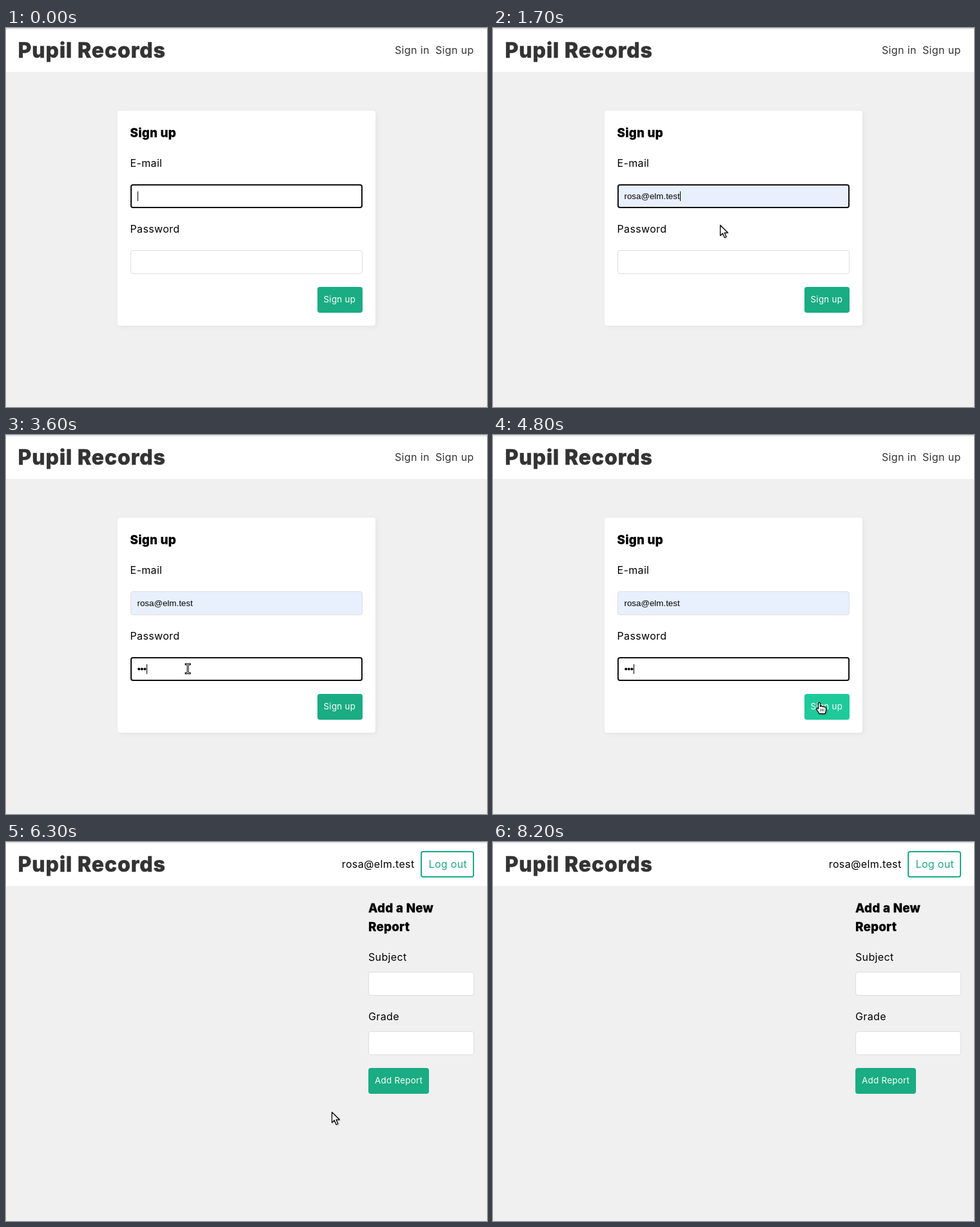
Write an HTML page that moves like this. It is 746 px wide and 587 px high and loops after 8600 ms.

```html
<!DOCTYPE html>
<html lang="en">
<head>
<meta charset="utf-8">
<title>Sign up demo</title>
<style>
  html, body { margin: 0; width: 100%; height: 100%; overflow: hidden; background: #f0f0f0; }
  svg { display: block; width: 746px; height: 587px; }
  text { font: 16px Inter, sans-serif; letter-spacing: .35px; }
  .title { font-size: 32px; font-weight: 800; fill: #333; stroke: #333; stroke-width: .6; letter-spacing: .95px; }
  .heading { font-size: 18.72px; font-weight: 800; stroke: #000; stroke-width: .3; letter-spacing: .3px; }
  .nav { fill: #333; }
  .label { font-size: 13.33px; fill: #fff; letter-spacing: .3px; }
  .typed { font: 13.33px "Liberation Sans", Arial, sans-serif; letter-spacing: 0; }
  .hint { font: 13.6px "Noto Sans", sans-serif; letter-spacing: 0; fill: #222; }
  .button { fill: #1aac83; }
  .field { fill: #fff; stroke: #ddd; }
  .ring { fill: none; stroke: #101010; stroke-width: 2; }
  .card { fill: #fff; filter: drop-shadow(2px 2px 3px rgba(0, 0, 0, .05)); }
  .popup { fill: #fff; filter: drop-shadow(0 1px 1.5px rgba(0, 0, 0, .3)); }
  .outlined { fill: #fff; stroke: #000; stroke-width: 1.25; stroke-linejoin: round; filter: drop-shadow(1px 1px 1px rgba(0, 0, 0, .25)); }
</style>
</head>
<body>
<svg viewBox="0 0 746 587">
  <defs>
    <linearGradient id="edge" x2="0" y2="1">
      <stop stop-color="#d8d8d8"/><stop offset="1" stop-color="#fff"/>
    </linearGradient>
    <path id="beamShape" d="M-3 -7H-1.5L0 -6L1.5 -7H3M0 -6V6M-3 7H-1.5L0 6L1.5 7H3"/>
  </defs>
  <rect width="746" height="587" fill="#f0f0f0"/>
  <rect width="746" height="68" fill="#fff"/>
  <rect width="746" height="3" fill="url(#edge)"/>
  <text class="title" x="18.5" y="45.5">Pupil Records</text>

  <g id="signup">
    <text class="nav" x="603" y="40">Sign in</text>
    <text class="nav" x="666" y="40">Sign up</text>
    <rect class="card" x="173" y="128" width="400" height="333" rx="4"/>
    <text class="heading" x="192.5" y="169">Sign up</text>
    <text x="192.5" y="215">E-mail</text>
    <rect class="field" id="emailField" x="193.5" y="242.5" width="359" height="36" rx="3.5"/>
    <text class="typed" id="email" x="203.5" y="265"></text>
    <text x="192.5" y="317">Password</text>
    <rect class="field" x="193.5" y="344.5" width="359" height="36" rx="3.5"/>
    <g id="dots">
      <circle cx="206.2" cy="362.5" r="2"/>
      <circle cx="210.8" cy="362.5" r="2"/>
      <circle cx="215.4" cy="362.5" r="2"/>
    </g>
    <rect class="ring" id="ring" x="194" width="358" height="35" rx="3"/>
    <rect id="caret" width="1" height="15"/>
    <rect class="button" id="submit" x="483" y="401" width="70" height="40" rx="4"/>
    <text class="label" x="492.5" y="425">Sign up</text>
    <g id="popup">
      <path class="popup" d="M294 288H304L313 279.5L322 288H420Q423 288 423 291V329Q423 332 420 332H294Q291 332 291 329V291Q291 288 294 288Z"/>
      <text class="hint" x="303.5" y="315">rosa@elm.test</text>
    </g>
  </g>

  <g id="home">
    <text x="633.5" y="40" text-anchor="end">rosa@elm.test</text>
    <rect x="644" y="15" width="81" height="39" rx="3" fill="#fff" stroke="#1aac83" stroke-width="2"/>
    <text x="655.5" y="40" fill="#1aac83">Log out</text>
    <text class="heading" x="562" y="109">Add a New</text>
    <text class="heading" x="562" y="138">Report</text>
    <text x="562" y="184">Subject</text>
    <rect class="field" x="562.5" y="201.5" width="163" height="36" rx="3.5"/>
    <text x="562" y="276">Grade</text>
    <rect class="field" x="562.5" y="293.5" width="163" height="36" rx="3.5"/>
    <rect class="button" x="562" y="350" width="94" height="40" rx="4"/>
    <text class="label" x="572" y="374">Add Report</text>
  </g>

  <g id="arrow">
    <path class="outlined" d="M.5 .5V16.5L4.3 13L7.2 19.7L9.8 18.5L7 12H12.2Z"/>
  </g>
  <g id="beam" fill="none">
    <use href="#beamShape" stroke="#000" stroke-width="3" stroke-linecap="square"/>
    <use href="#beamShape" stroke="#fff"/>
  </g>
  <g id="hand">
    <path class="outlined" d="M-1.5 1.5Q0 -.8 1.5 1.5V6.5Q3.5 5 5 7Q6.5 6 8 7.5Q10.5 7 10.5 9.5V13L9 17.5H0L-4 11Q-4.5 8.2 -2.5 9L-1.5 10Z"/>
    <path d="M2 10V14M4.5 10V14M7 10V14" stroke="#000" stroke-width=".8"/>
  </g>
</svg>
<script>
const LOOP = 8600;
const ADDRESS = "rosa@elm.test";
const $ = id => document.getElementById(id);
const show = (id, on) => { $(id).style.display = on ? "" : "none"; };

// Pointer hot spot: [time, x, y]
const PATH = [
  [900, 714, 350], [1000, 650, 338], [1100, 540, 318], [1200, 430, 300], [1300, 361, 291],
  [1400, 356, 302], [1500, 352, 305], [1700, 352, 305], [1900, 325, 330], [2100, 284, 361],
  [2200, 282, 363], [4200, 282, 361], [4300, 300, 355], [4400, 360, 364], [4500, 430, 385],
  [4600, 490, 404], [4700, 503, 411], [4800, 506, 414], [5000, 506, 418], [7000, 505, 418],
  [7100, 502, 405], [7200, 497, 392], [7300, 494, 383], [7400, 494, 383], [7500, 362, 264],
  [7600, 255, 170], [7700, 170, 104], [7800, 108, 60], [8000, 45, 18], [8100, 24, 2]
];

function pointerAt(t) {
  const next = PATH.findIndex(p => p[0] > t);
  if (next < 0) return PATH[PATH.length - 1].slice(1);
  const [t0, x0, y0] = PATH[Math.max(next - 1, 0)], [t1, x1, y1] = PATH[next];
  const k = t1 > t0 ? (t - t0) / (t1 - t0) : 0;
  return [Math.round(x0 + (x1 - x0) * k), Math.round(y0 + (y1 - y0) * k)];
}

function pointerShape(t, x, y) {
  if (t < 900 || t >= 8200) return null;
  if (t >= 6300) return "arrow";
  if (x > 483 && x < 553 && y > 401 && y < 441) return "hand";
  const overPopup = t < 1700 && y > 287 && x > 291 && x < 423;
  const overField = x > 193 && x < 553 && y > 344 && y < 381;
  return overField && !overPopup ? "beam" : "arrow";
}

function caretVisible(t) {
  if (t < 600) return t < 300;
  if (t < 2900) return true;
  if (t < 3200) return false;
  if (t < 3600) return true;
  return Math.floor((t - 3600) / 600) % 2 === 0 && t < 6000;
}

function drawForm(t) {
  const letters = t < 600 ? 0 : t < 800 ? 1 : t < 1000 ? 2 : t < 1700 ? 3 : ADDRESS.length;
  const dots = t < 3200 ? 0 : t < 3400 ? 1 : t < 3600 ? 2 : 3;
  const onPassword = t >= 2200;
  const email = $("email");
  email.textContent = ADDRESS.slice(0, letters);
  $("emailField").style.fill = t >= 1700 ? "#e8f0fe" : "#fff";
  [...$("dots").children].forEach((dot, i) => { dot.style.display = i < dots ? "" : "none"; });

  show("popup", t >= 700 && t < 1700);
  show("ring", t < 6000);
  $("ring").setAttribute("y", onPassword ? 345 : 243);
  show("caret", caretVisible(t));
  const caretX = 204 + (onPassword ? dots * 4.67 : email.getComputedTextLength());
  $("caret").setAttribute("x", Math.floor(caretX));
  $("caret").setAttribute("y", onPassword ? 355 : 253);

  const hover = Math.min(1, Math.max(0, (t - 4550) / 300));
  const mix = (a, b) => Math.round(a + (b - a) * hover);
  $("submit").style.fill = `rgb(${mix(26, 32)}, ${mix(172, 208)}, ${mix(131, 159)})`;
}

function draw(now) {
  const t = Math.floor(now % LOOP / 100) * 100;
  const signedIn = t >= 6200;
  show("signup", !signedIn);
  show("home", signedIn);
  if (!signedIn) drawForm(t);

  const [x, y] = pointerAt(t), shape = pointerShape(t, x, y);
  for (const id of ["arrow", "beam", "hand"]) {
    show(id, id === shape);
    $(id).setAttribute("transform", `translate(${x} ${y})`);
  }
}

const start = performance.now();
function tick() {
  draw(performance.now() - start);
  requestAnimationFrame(tick);
}
tick();
</script>
</body>
</html>
```
